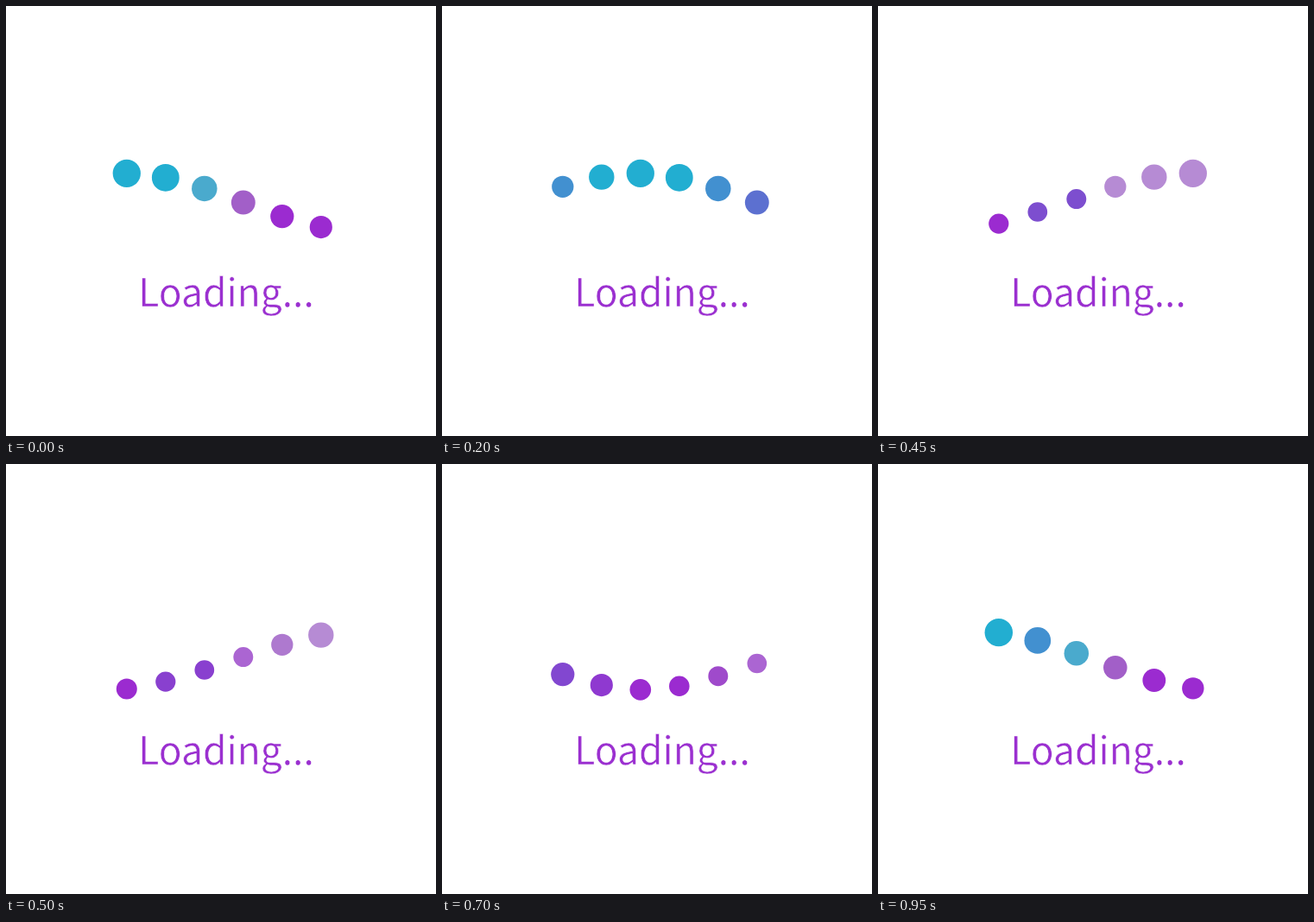
Recreate the animation shown at these times as an HTML page. Size 498 by 498 pixels, loop 1000 ms.

```html
<!DOCTYPE html>
<html lang="en">
<head>
<meta charset="utf-8">
<title>Loading</title>
<style>
html, body { margin: 0; width: 100%; height: 100%; overflow: hidden; background: #fff; }
svg { display: block; width: 100%; height: 100%; }
text {
  font: 44.4px "Noto Sans CJK SC", "Noto Sans CJK JP", "Noto Sans CJK", sans-serif;
  fill: #9b30d0;
  stroke: #fff; /* thins the letters slightly */
  stroke-width: .5px;
}
</style>
</head>
<body>
<svg viewBox="0 0 498 498"><text x="153.2" y="348">Loading...</text></svg>
<script>
const STEPS = 25, DOTS = 6, TICK = 50, LOOP = 1000;
const { sin, cos, floor, max, round, PI } = Math;

const PALETTE = {
  teal: [34, 174, 209], sky: [74, 170, 205], blue: [66, 144, 208], indigo: [92, 112, 208],
  violet: [125, 78, 207], purple: [155, 43, 208], orchid: [162, 95, 200], lilac: [182, 139, 212]
};
// Dot colours, left to right, at a few steps of the loop
const KEYS = [
  [0, "teal teal sky orchid purple purple"],
  [4, "blue teal teal teal blue indigo"],
  [8, "violet indigo indigo indigo indigo indigo"],
  [10, "purple violet violet lilac lilac lilac"],
  [15, "purple purple purple purple orchid lilac"],
  [20, "indigo violet purple purple purple purple"],
  [24, "teal blue sky orchid purple purple"]
].map(([step, names]) => ({ step, colors: names.split(" ").map(n => PALETTE[n]) }));

function colorAt(step, dot) {
  const k = KEYS.findLastIndex(key => key.step <= step);
  const a = KEYS[k], b = KEYS[k + 1] || KEYS[k];
  const f = (step - a.step) / (b.step - a.step || 1);
  return `rgb(${a.colors[dot].map((c, i) => round(c + (b.colors[dot][i] - c) * f))})`;
}

// A slightly uneven wave: quick shrink on the way down, slow growth on the way up
const height = a => 227.5 - 33.1 * cos(a) - 2.1 * sin(a) + .8 * sin(2 * a) - .6 * cos(3 * a);
const radius = a => 13.4 + 1.7 * cos(a) - 1.25 * sin(a) + .75 * cos(2 * a) + .3 * cos(3 * a);

// Steady ticks that, after a short start, regularly jump over a step
function stepAt(time) {
  const tick = floor(time % LOOP / TICK);
  return tick + max(0, floor(.36 * tick - 1.3));
}

const svg = document.querySelector("svg");
const dots = Array.from({ length: DOTS }, (_, i) => {
  const c = document.createElementNS(svg.namespaceURI, "circle");
  c.setAttribute("cx", 139.8 + 45 * i);
  return svg.appendChild(c);
});

function draw(time) {
  const step = stepAt(time);
  dots.forEach((c, i) => {
    const angle = (step - 2 * i) / STEPS * 2 * PI;
    c.setAttribute("cy", height(angle));
    c.setAttribute("r", radius(angle));
    c.setAttribute("fill", colorAt(step, i));
  });
}

const start = performance.now();
function loop() {
  draw(performance.now() - start);
  requestAnimationFrame(loop);
}
loop();
</script>
</body>
</html>
```
